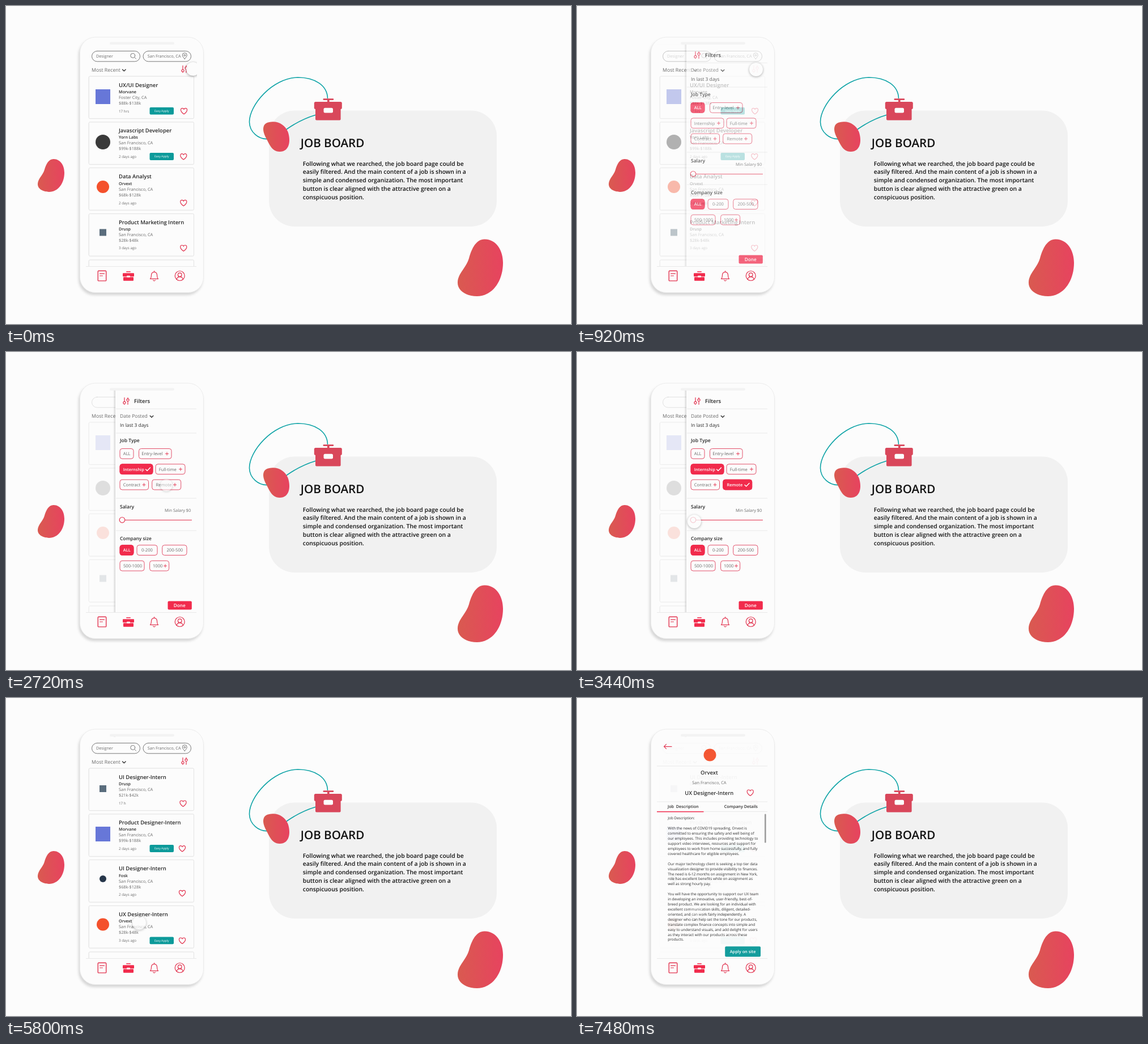
An HTML page for the animation above (8120 ms loop, 997 px wide and 561 px high).

```html
<!DOCTYPE html>
<html lang="en">
<head>
<meta charset="utf-8">
<title>Job board</title>
<style>
  html, body { margin: 0; width: 100%; height: 100%; overflow: hidden; background: #fcfcfc; }
  svg { display: block; width: 100vw; height: 100vh; }
  text { font-family: "Open Sans", "Noto Sans", sans-serif; text-rendering: geometricPrecision; white-space: pre; fill: #6a6a6a; }
  .b { font-weight: 600; }
  .k { fill: #262626; }
  .ink { fill: #111; }
  .w { fill: #fff; }
  .mid { text-anchor: middle; }
  .end { text-anchor: end; }
  .line { fill: none; stroke: #e2334f; stroke-width: 1.2; stroke-linecap: round; stroke-linejoin: round; }
  .thick { stroke-width: 1.4; }
  .thin { stroke-width: .9; }
  .gray { stroke: #777; stroke-width: 1; }
  .dark { stroke: #333; }
  .white { stroke: #fff; }
  .rule { stroke: #e9e9e9; stroke-width: 1; }
  .red { fill: #f12b4c; }
  .teal { fill: #0c9a9a; }
  .card { fill: #fcfcfc; stroke: #e3e3e3; filter: drop-shadow(0 .5px .5px rgba(0,0,0,.08)); }
  .phone { fill: #fcfcfc; stroke: #ebebeb; filter: drop-shadow(-2px 4px 2px rgba(0,0,0,.15)); }

  .anim { animation: 8120ms linear infinite; }
  #filters { animation-name: filters; }
  #results { animation-name: results; }
  #detail { animation-name: detail; }
  .allOn { animation-name: allOn; }
  .internOn { animation-name: internOn; }
  .remoteOn { animation-name: remoteOn; }
  #knob { animation-name: knob; }
  #pay0 { animation-name: payOut; }
  #pay1 { animation-name: payIn; }
  #cursor { animation-name: move; }
  #dot { animation-name: press; }

  @keyframes filters {
    0%, 7.88% { opacity: 0; animation-timing-function: ease-out; }
    14.29%, 100% { opacity: 1; }
  }
  @keyframes results {
    0%, 59.6% { opacity: 0; animation-timing-function: ease-out; }
    64.53%, 100% { opacity: 1; }
  }
  @keyframes detail {
    0%, 78.3% { opacity: 0; animation-timing-function: ease-out; }
    84.5% { opacity: .93; }
    92.1%, 100% { opacity: .965; }
  }
  @keyframes allOn {
    0%, 23.15% { opacity: 1; animation-timing-function: ease-out; }
    26.11%, 100% { opacity: 0; }
  }
  @keyframes internOn {
    0%, 23.15% { opacity: 0; animation-timing-function: ease-out; }
    26.11%, 100% { opacity: 1; }
  }
  @keyframes remoteOn {
    0%, 33.5% { opacity: 0; animation-timing-function: ease-out; }
    36.45%, 100% { opacity: 1; }
  }
  @keyframes knob {
    0%, 43.84% { transform: translateX(0); animation-timing-function: ease-in-out; }
    49.75%, 100% { transform: translateX(17.5px); }
  }
  @keyframes payOut { 0%, 44.3% { opacity: 1; } 49.3%, 100% { opacity: 0; } }
  @keyframes payIn { 0%, 44.3% { opacity: 0; } 49.3%, 100% { opacity: 1; } }
  @keyframes move {
    0%, 1.48% { transform: translate(330px, 111px); animation-timing-function: ease-in-out; }
    6.4%, 14.29% { transform: translate(316px, 112px); animation-timing-function: ease-in-out; }
    22.17%, 26.11% { transform: translate(228px, 207px); animation-timing-function: ease-in-out; }
    32.02%, 35.2% { transform: translate(283px, 235px); animation-timing-function: ease-in-out; }
    41.38%, 43.84% { transform: translate(207px, 299px); animation-timing-function: ease-in-out; }
    49.75%, 51.23% { transform: translate(224.5px, 299px); animation-timing-function: ease-in-out; }
    57.64%, 65.5% { transform: translate(297px, 447px); animation-timing-function: ease-in-out; }
    74.88%, 100% { transform: translate(211px, 377px); }
  }
  @keyframes press {
    0%, 6.4% { transform: scale(1); opacity: .92; }
    8.2% { transform: scale(.88); opacity: .6; }
    10.5%, 22.17% { transform: scale(1); opacity: .8; }
    24%, 25% { transform: scale(.9); opacity: .5; }
    27%, 32.02% { transform: scale(1); opacity: .8; }
    33.5% { transform: scale(.88); opacity: .5; }
    35.2%, 43% { transform: scale(1); opacity: .75; }
    44%, 49.75% { transform: scale(.92); opacity: .55; }
    51.2%, 57.64% { transform: scale(1); opacity: .75; }
    59.11% { transform: scale(.88); opacity: .42; }
    61%, 75% { transform: scale(1); opacity: .7; }
    76.8% { transform: scale(.88); opacity: .5; }
    78.3% { transform: scale(1); opacity: .6; }
    84.5%, 100% { transform: scale(1); opacity: .2; }
  }
</style>
</head>
<body>
<svg id="stage" viewBox="0 0 997 561" preserveAspectRatio="none"></svg>
<script>
const RED = '#f12b4c';

const text = (x, y, size, str, cls = '') =>
  `<text x="${x}" y="${y}" font-size="${size}" class="${cls}">${str}</text>`;
const path = (d, cls = '') => `<path d="${d}" class="line ${cls}"/>`;
const rect = (x, y, w, h, r, attrs) =>
  `<rect x="${x}" y="${y}" width="${w}" height="${h}" rx="${r}" ${attrs}/>`;
const at = (x, y, body) => `<g transform="translate(${x} ${y})">${body}</g>`;
const rule = (y, x1 = 141, x2 = 336) => `<path d="M${x1} ${y}H${x2}" class="rule"/>`;

const heart = (x, y) => at(x, y, path('M0 5.4C-7.6.4-6.2-5-2.9-5-1.2-5 0-3.7 0-2.9 0-3.7 1.2-5 2.9-5 6.2-5 7.6.4 0 5.4Z'));
const chevron = (x, y) => at(x, y, path('M-2.8-1.4 0 1.4 2.8-1.4', 'thick dark'));
const plus = (x, y) => at(x, y, path('M-2.6 0H2.6M0-2.6V2.6', 'thin'));
const check = (x, y) => at(x, y, path('M-4 .2-1.4 2.8 4-2.8', 'thick white'));
const sliders = (x, y) => at(x, y, path('M-3-5.8V.8M-3 5V6M3-6V-4M3 .4V6')
  + '<circle cx="-3" cy="2.9" r="2.1" class="line"/><circle cx="3" cy="-1.8" r="2.1" class="line"/>');

// Company marks: one plain shape each
const dot = (r, fill) => `<circle r="${r}" fill="${fill}"/>`;
const box = (s, fill) => rect(-s / 2, -s / 2, s, s, 0, `fill="${fill}"`);
const firms = {
  Morvane: box(26, '#6777d8'),
  'Yorn Labs': dot(13, '#3a3a3a'),
  Orvext: dot(11, '#f4512c'),
  Drusp: box(12, '#5a6d7d'),
  Fosk: dot(6, '#26364a')
};

const cardTops = [124, 204.8, 285.5, 366.5, 448];
const titleY = [143.3, 223.4, 303.6, 384.5];
const firmY = [153.7, 233.7, 316.2, 395.8];
const markY = [160, 240, 319, 399.5];

const frames = () => cardTops.map(y => rect(146.2, y, 185.3, 74.6, 2, 'class="card"')).join('');
const marks = jobs => jobs.map((j, i) => at(171, markY[i], firms[j.firm])).join('');

function row(j, i) {
  const y = firmY[i];
  let out = text(199, titleY[i], 9.45, j.title, 'b k')
    + text(199, y, 7.2, j.firm, 'b k')
    + text(199, y + 9.9, 7.45, j.city || 'San Francisco, CA')
    + text(199, y + 19.8, 7.25, j.pay)
    + text(199, j.y + 2.2, 6.3, j.age)
    + heart(j.heart[0], j.heart[1]);
  if (j.easy) out += rect(253.5, j.y - 6.5, 42.5, 12.8, 2, 'class="teal"')
    + text(274.8, j.y + 1.8, 5.2, 'Easy Apply', 'w mid');
  return out;
}

const backdrop = rect(141, 68.5, 196, 391, 0, 'fill="#fcfcfc"');

const header = () =>
  rect(151.5, 79.5, 85, 18.4, 9.2, 'class="line gray"') + text(159, 91.2, 7.2, 'Designer')
  + at(224.5, 88.3, '<circle cx="-.8" cy="-.8" r="3.9" class="line gray"/>' + path('M2 2 5 5', 'gray'))
  + rect(242, 79.5, 84.5, 18.4, 9.2, 'class="line gray"') + text(249.7, 91.2, 7.25, 'San Francisco, CA')
  + at(315.3, 88.3, path('M0 5.2C-2.6 2-4 0-4-1.6A4 4 0 0 1 4-1.6C4 0 2.6 2 0 5.2Z', 'gray') + '<circle cy="-1.4" r="1.4" class="line gray"/>')
  + text(151, 116, 8.8, 'Most Recent') + chevron(208.3, 113.3) + sliders(315, 111.2);

const list = jobs => backdrop + header() + frames() + marks(jobs) + jobs.map(row).join('');

const jobs = [
  { title: 'UX/UI Designer', firm: 'Morvane', city: 'Foster City, CA', pay: '$88k-$138k', age: '17 hrs', y: 185.3, heart: [314, 185.3], easy: 1 },
  { title: 'Javascript Developer', firm: 'Yorn Labs', pay: '$99k-$188k', age: '2 days ago', y: 265.6, heart: [313.3, 265.6], easy: 1 },
  { title: 'Data Analyst', firm: 'Orvext', pay: '$68k-$128k', age: '2 days ago', y: 347.3, heart: [313.3, 347.3] },
  { title: 'Product Marketing Intern', firm: 'Drusp', pay: '$28k-$48k', age: '3 days ago', y: 427, heart: [313.3, 427] }
];
const interns = [
  { title: 'UI Designer-Intern', firm: 'Drusp', pay: '$21k-$42k', age: '17 h', y: 186, heart: [312.5, 186] },
  { title: 'Product Designer-Intern', firm: 'Morvane', pay: '$99k-$188k', age: '2 days ago', y: 265.6, heart: [311, 265.6], easy: 1 },
  { title: 'UI Designer-Intern', firm: 'Fosk', pay: '$68k-$128k', age: '2 days ago', y: 346.8, heart: [311, 344.3] },
  { title: 'UX Designer-Intern', firm: 'Orvext', pay: '$28k-$48k', age: '3 days ago', y: 428, heart: [311, 428], easy: 1 }
];

function pill(x, y, w, label, opt = {}) {
  const tx = x + (opt.pad || 5.8), ty = y + 11.7;
  const off = rect(x, y, w, 17.8, 4, 'fill="#fcfcfc" stroke="#e2506a"')
    + text(tx, ty, 7.65, label) + (opt.plus ? plus(opt.plus, y + 9) : '');
  if (!opt.on) return off;
  return off + `<g class="anim ${opt.on}">` + rect(x, y, w, 17.8, 4, `fill="${RED}" stroke="${RED}"`)
    + text(tx, ty, 7.4, label, 'b w') + (opt.check ? check(opt.check, y + 9) : '') + '</g>';
}

const filters = backdrop
  + '<g opacity=".2">' + rect(151.5, 79.5, 85, 18.4, 9.2, 'class="line gray"') + '</g>'
  + text(151, 116, 8.8, 'Most Recent')
  + '<g opacity=".6">' + frames() + '</g><g opacity=".15">' + marks(jobs) + '</g>'
  + rect(189, 67, 4, 392, 0, 'fill="url(#edge)"') + rect(193, 67, 144, 392, 0, 'fill="#fcfcfc"')
  + [100.3, 143, 258, 315].map(y => rule(y, 194)).join('')
  + sliders(212, 86.5) + text(226, 89.7, 9.45, 'Filters', 'b k')
  + text(201, 116.1, 8.6, 'Date Posted') + chevron(257, 113.8)
  + text(201, 132.2, 8.4, 'In last 3 days', 'k')
  + text(201, 159, 8.5, 'Job Type', 'b k')
  + pill(201, 170.5, 24, 'ALL', { on: 'allOn' })
  + pill(234.5, 170.5, 57.5, 'Entry-level', { pad: 4.7, plus: 284 })
  + pill(201, 197.8, 58, 'Internship', { plus: 250, on: 'internOn', check: 250.5 })
  + pill(264, 197.8, 52, 'Full-time', { plus: 308 })
  + pill(201, 225.2, 50.5, 'Contract', { plus: 243.5 })
  + pill(257.7, 225.2, 51, 'Remote', { pad: 6.8, plus: 298, on: 'remoteOn', check: 300 })
  + text(201, 276.2, 8.5, 'Salary', 'b k')
  + `<g id="pay0" class="anim">${text(326.3, 282.3, 7.4, 'Min Salary $0', 'end')}</g>`
  + `<g id="pay1" class="anim">${text(327.2, 282.3, 7.4, 'Min Salary $21k', 'end')}</g>`
  + path('M203.5 296.5H327.5')
  + '<circle id="knob" class="anim line" cx="205" cy="296.3" r="4.8" style="fill:#fcfcfc"/>'
  + text(201, 332.3, 8.4, 'Company size', 'b k')
  + pill(201, 340.7, 24, 'ALL', { on: 'always' })
  + pill(231, 340.7, 36, '0-200', { pad: 8 })
  + pill(275.7, 340.7, 43.3, '200-500', { pad: 7.8 })
  + pill(201, 368.3, 43, '500-1000', { pad: 6 })
  + pill(253.6, 368.3, 34, '1000', { pad: 5.4, plus: 281 })
  + rect(285.5, 439.5, 42.3, 15, 2, 'class="red"') + text(306.3, 449.9, 8.2, 'Done', 'b w mid');

const body = [
  'Job Description:', '',
  'With the news of COVID19 spreading, Orvext is',
  'committed to ensuring the safety and well being of',
  'our employees. This includes providing technology to',
  'support video interviews, resources and support for',
  'employees to work from home successfully, and fully',
  'covered healthcare for eligible employees.', '',
  'Our major technology client is seeking a top tier data',
  'visualization designer to provide visibility to finances.',
  'The need is 6-12 months on assignment in New York,',
  'role has excellent benefits while on assignment as',
  'well as strong hourly pay.', '',
  'You will have the opportunity to support our UX team',
  'in developing an innovative, user-friendly, best-of-',
  'breed product. We are looking for an individual with',
  'excellent communication skills, diligent, detailed-',
  'oriented, and can work fairly independently. A',
  'designer who can help set the tone for our products,',
  'translate complex finance concepts into simple and',
  'easy to understand visuals, and add delight for users',
  'as they interact with our products across these',
  'products.'
];

const detail = backdrop
  + path('M153.5 85.7H167M157.5 81.7 153.5 85.7 157.5 89.7')
  + at(234.5, 100.5, firms.Orvext) + rule(120)
  + text(233.4, 135.4, 9.45, 'Orvext', 'b k mid')
  + text(233.4, 152.2, 7.45, 'San Francisco, CA', 'mid')
  + text(233.2, 170.5, 9.35, 'UX Designer-Intern', 'b k mid') + heart(305.7, 167)
  + rule(183) + rule(200.5)
  + text(160, 193.5, 7.2, 'Job  Description', 'b k') + text(259.7, 193.5, 7.25, 'Company Details', 'b k')
  + rect(141, 199.8, 82.5, 1.6, 0, 'class="red"')
  + rect(331, 204.5, 2.6, 51, 1.3, 'fill="#9a9a9a"')
  + body.map((s, i) => text(160.3, 214.4 + i * 8.92, 6.45, s, 'k')).join('')
  + rect(261.2, 438.3, 62.8, 18.2, 2, 'class="teal"') + text(292.6, 450.2, 7.35, 'Apply on site', 'b w mid');

const nav = rule(459.5)
  + rect(162.3, 467.3, 14.4, 17.6, 1, 'class="line thick"') + path('M165.5 472.2H173.5M165.5 476H170.5')
  + at(216, 476, rect(-4, -8, 8, 1.6, .8, 'class="red"') + rect(-10, -4.8, 20, 6, 1, 'class="red"')
    + rect(-9, 2.2, 18, 6.6, 1, 'class="red"') + rect(-3, -.2, 6, 3, 1, 'fill="#fcfcfc"'))
  + at(261.5, 476, path('M-7 5.4C-4.6 3-5.2.4-5-1.6-4.6-5-2.4-6.6 0-6.6S4.6-5 5-1.6C5.2.4 4.6 3 7 5.4ZM0-8.6V-6.8M-1.8 7.6A1.9 1.9 0 0 0 1.8 7.6'))
  + at(306.7, 476, '<circle r="8.5" class="line"/><circle cy="-1.8" r="3.3" class="line"/>' + path('M-5.6 6C-5 3.2-2.8 1.8 0 1.8S5 3.2 5.6 6'));

const copy = [
  'Following what we rearched, the job board page could be',
  'easily filtered. And the main content of a job is shown in a',
  'simple and condensed organization. The most important',
  'button is clear aligned with the attractive green on a',
  'conspicuous position.'
];

const scene = rect(464, 184.5, 402, 204.5, 45, 'fill="#f1f1f1"')
  + '<path fill="none" stroke="#0ea3a6" stroke-width="1.6" d="M567.5 163C567 140 545 126 515 126 470 127 429 175 429.5 205 430 222 445 236 463 234.5 480 232 488 222 498 215.5 515 204 530 197 547 192"/>'
  + '<path fill="url(#warm)" d="M470 204.3C482 203.5 493 211 497.5 222 503 238 500 257 483 257 471 257 466 247 461 237 456 228 452 219 455 211.5 457.5 206 464 204.5 470 204.3Z"/>'
  + '<g fill="#d9475b">' + rect(559.5, 163.2, 18.7, 2.8, 1.2, '') + rect(567, 165, 3.6, 5, 0, '')
  + rect(543.8, 169, 49, 13, 2.5, '') + rect(546, 180, 44.6, 21.4, 2, '') + '</g>'
  + rect(560.5, 179.7, 16.5, 8.7, 2.5, 'fill="#fcfcfc"')
  + text(519.8, 248.6, 20.6, 'JOB BOARD', 'b ink')
  + copy.map((s, i) => text(523.8, 281.8 + i * 14.68, 10.35, s, 'b ink')).join('')
  + '<path id="blob" fill="url(#warm)" d="M845 411.5C866 412 877 432 877 453 877 486 858 512 831 512 812 512 796 502 797 487 798 471 812 462 817 445 822 427 830 411 845 411.5Z"/>'
  + '<use href="#blob" transform="translate(56 270) scale(.5875 .576) translate(-797 -411.4)"/>';

document.getElementById('stage').innerHTML = `
  <defs>
    <linearGradient id="warm"><stop offset="0" stop-color="#d95a50"/><stop offset="1" stop-color="#e7435f"/></linearGradient>
    <linearGradient id="edge"><stop offset="0" stop-opacity="0"/><stop offset="1" stop-opacity=".15"/></linearGradient>
    <clipPath id="screen"><rect x="141" y="67" width="196" height="392.5"/></clipPath>
    <clipPath id="touch"><rect x="141" y="67" width="196" height="426"/></clipPath>
  </defs>
  <rect width="997" height="561" fill="#fcfcfc"/>
  ${scene}
  ${rect(130.5, 55, 218, 450.5, 27, 'class="phone"')}
  <g clip-path="url(#screen)">
    <g>${list(jobs)}</g>
    <g id="filters" class="anim">${filters}</g>
    <g id="results" class="anim">${list(interns)}</g>
    <g id="detail" class="anim">${detail}</g>
  </g>
  ${rect(183, 63.5, 114, 4.5, 2.2, 'fill="#f3f3f3"')}
  ${nav}
  <g clip-path="url(#touch)">
    <g id="cursor" class="anim"><circle id="dot" class="anim" r="12" fill="#fcfcfc" style="filter:drop-shadow(0 1px 2px rgba(0,0,0,.4))"/></g>
  </g>`;
</script>
</body>
</html>
```
